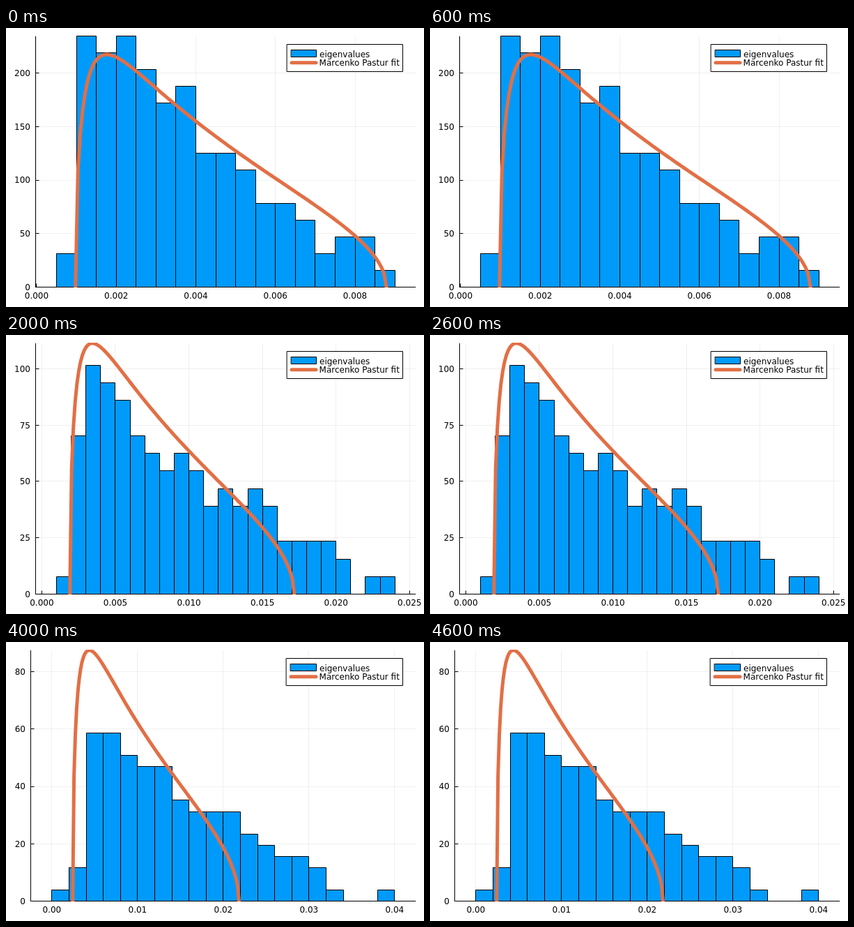
An HTML page with a canvas for the animation above (5000 ms loop, 600 px wide and 400 px high).

```html
<!DOCTYPE html>
<html lang="en">
<head>
<meta charset="utf-8">
<title>Eigenvalue histogram</title>
<style>
html, body { margin: 0; width: 100%; height: 100%; overflow: hidden; background: #fff; }
canvas { display: block; }
</style>
</head>
<body>
<canvas id="stage" width="600" height="400"></canvas>
<script>
const ctx = document.getElementById("stage").getContext("2d");
const HOLD = 1000, TOTAL = 128;
const TOP = 11.8, BOTTOM = 371.6, RIGHT = 588.2;
const BLUE = "#009afa", ORANGE = "#e26f46";

// left: axis x, start/bin: histogram bins, s: variance of the fitted law
const panels = [
  { left: 42.5, start: .0005, bin: .0005, s: 1 / 256, xStep: .002, digits: 3, yStep: 50,
    counts: [2, 15, 14, 15, 13, 11, 12, 8, 8, 7, 5, 5, 4, 2, 3, 3, 1] },
  { left: 42.5, start: .0005, bin: .0005, s: .00625, xStep: .005, digits: 3, yStep: 25,
    counts: [1, 0, 6, 9, 9, 9, 9, 5, 7, 6, 5, 6, 6, 3, 5, 5, 3, 5, 3, 2, 4, 3, 3, 2, 2, 2, 1, 2, 2, 1, 0, 1, 1] },
  { left: 42.5, start: .001, bin: .001, s: .007626, xStep: .005, digits: 3, yStep: 25,
    counts: [1, 9, 13, 12, 11, 9, 8, 7, 8, 7, 5, 6, 5, 6, 5, 3, 3, 3, 3, 2, 0, 1, 1] },
  { left: 35.5, start: .001, bin: .001, s: .008874, xStep: .01, digits: 2, yStep: 20,
    counts: [1, 1, 9, 11, 9, 8, 8, 8, 7, 5, 7, 5, 6, 3, 6, 5, 4, 4, 3, 3, 3, 2, 4, 0, 3, 1, 0, 1, 0, 0, 1] },
  { left: 35.5, start: 0, bin: .002, s: .009706, xStep: .01, digits: 2, yStep: 20,
    counts: [1, 3, 15, 15, 13, 12, 12, 9, 8, 8, 8, 6, 5, 4, 4, 3, 1, 0, 0, 1] }
];

const snap = v => Math.floor(v) + .5;

function line(x1, y1, x2, y2, color) {
  ctx.strokeStyle = color;
  ctx.lineWidth = 1;
  ctx.beginPath();
  ctx.moveTo(x1, y1);
  ctx.lineTo(x2, y2);
  ctx.stroke();
}

function box(x1, y1, x2, y2, fill) {
  ctx.fillStyle = fill;
  ctx.strokeStyle = "#000";
  ctx.lineWidth = 1;
  ctx.beginPath();
  ctx.rect(x1, y1, x2 - x1, y2 - y1);
  ctx.fill();
  ctx.stroke();
}

function label(text, x, y, align) {
  ctx.fillStyle = "#000";
  ctx.textAlign = align;
  ctx.fillText(text, x, y);
}

// Marchenko-Pastur density with ratio 1/4 and unit variance
const density = x => Math.sqrt(Math.max(0, (2.25 - x) * (x - .25))) / (Math.PI / 2 * x);

function ticks(step, limit) {
  const list = [];
  for (let i = 0; i * step <= limit; i++) list.push(i * step);
  return list;
}

function drawAxes(p, px, py, xMax, yMax) {
  const xs = ticks(p.xStep, xMax), ys = ticks(p.yStep, yMax);
  const left = snap(p.left), base = snap(BOTTOM);
  const grid = "rgba(0,0,0,.06)";
  for (const v of xs) line(snap(px(v)), TOP, snap(px(v)), BOTTOM, grid);
  for (const v of ys) line(p.left, snap(py(v)), RIGHT, snap(py(v)), grid);
  line(left, TOP, left, base + .5, "#000");
  line(left, base, RIGHT, base, "#000");
  for (const v of xs) {
    const x = snap(px(v));
    line(x, base, x, base - 5, "#000");
    label(v.toFixed(p.digits), px(v), 388, "center");
  }
  for (const v of ys) {
    const y = snap(py(v));
    line(left, y, left + 5, y, "#000");
    label(String(v), p.left - 7.5, py(v) + 4.4, "right");
  }
}

function drawBars(p, px, py, unit) {
  p.counts.forEach((n, i) => {
    if (!n) return;
    const x = p.start + i * p.bin;
    box(snap(px(x)), snap(py(n * unit)), snap(px(x + p.bin)), snap(BOTTOM), BLUE);
  });
}

function drawFit(p, px, py) {
  const steps = 127;
  ctx.strokeStyle = ORANGE;
  ctx.lineWidth = 5;
  ctx.beginPath();
  for (let i = 0; i <= steps; i++) {
    const x = .25 + 2 * i / steps;
    ctx.lineTo(px(x * p.s), py(density(x) / p.s));
  }
  ctx.stroke();
}

function drawLegend(shift) {
  box(403.5 - shift, 23.5, 569.5, 62.5, "#fff");
  box(409.5 - shift, 31.5, 445.5, 41.5, BLUE);
  ctx.strokeStyle = ORANGE;
  ctx.lineWidth = 5;
  ctx.beginPath();
  ctx.moveTo(410 - shift, 49.8);
  ctx.lineTo(445, 49.8);
  ctx.stroke();
  label("eigenvalues", 450, 41.5, "left");
  label("Marcenko Pastur fit", 449.6, 54.2, "left");
}

function drawPanel(p) {
  const unit = 1 / (TOTAL * p.bin);
  const yMax = Math.max(Math.max(...p.counts) * unit, density(.45) / p.s);
  const width = RIGHT - p.left, span = width / 1.1236;
  const scale = span / (p.counts.length * p.bin);
  const zero = p.left + (width - span) / 2 - p.start * scale;
  const px = x => zero + x * scale;
  const py = y => BOTTOM - y / yMax * (BOTTOM - TOP);

  ctx.fillStyle = "#fff";
  ctx.fillRect(0, 0, 600, 400);
  ctx.font = '12px "DejaVu Sans", sans-serif';
  ctx.lineCap = "butt";
  ctx.lineJoin = "miter";
  drawAxes(p, px, py, (RIGHT - zero) / scale, yMax);

  ctx.save();
  ctx.beginPath();
  ctx.rect(p.left, 11, RIGHT - p.left, 361);
  ctx.clip();
  drawBars(p, px, py, unit);
  ctx.lineCap = ctx.lineJoin = "round";
  drawFit(p, px, py);
  ctx.restore();

  ctx.lineCap = "round";
  drawLegend(p.left < 40 ? 1 : 0);
}

function tick() {
  drawPanel(panels[Math.floor(performance.now() / HOLD) % panels.length]);
  requestAnimationFrame(tick);
}
tick();
</script>
</body>
</html>
```
